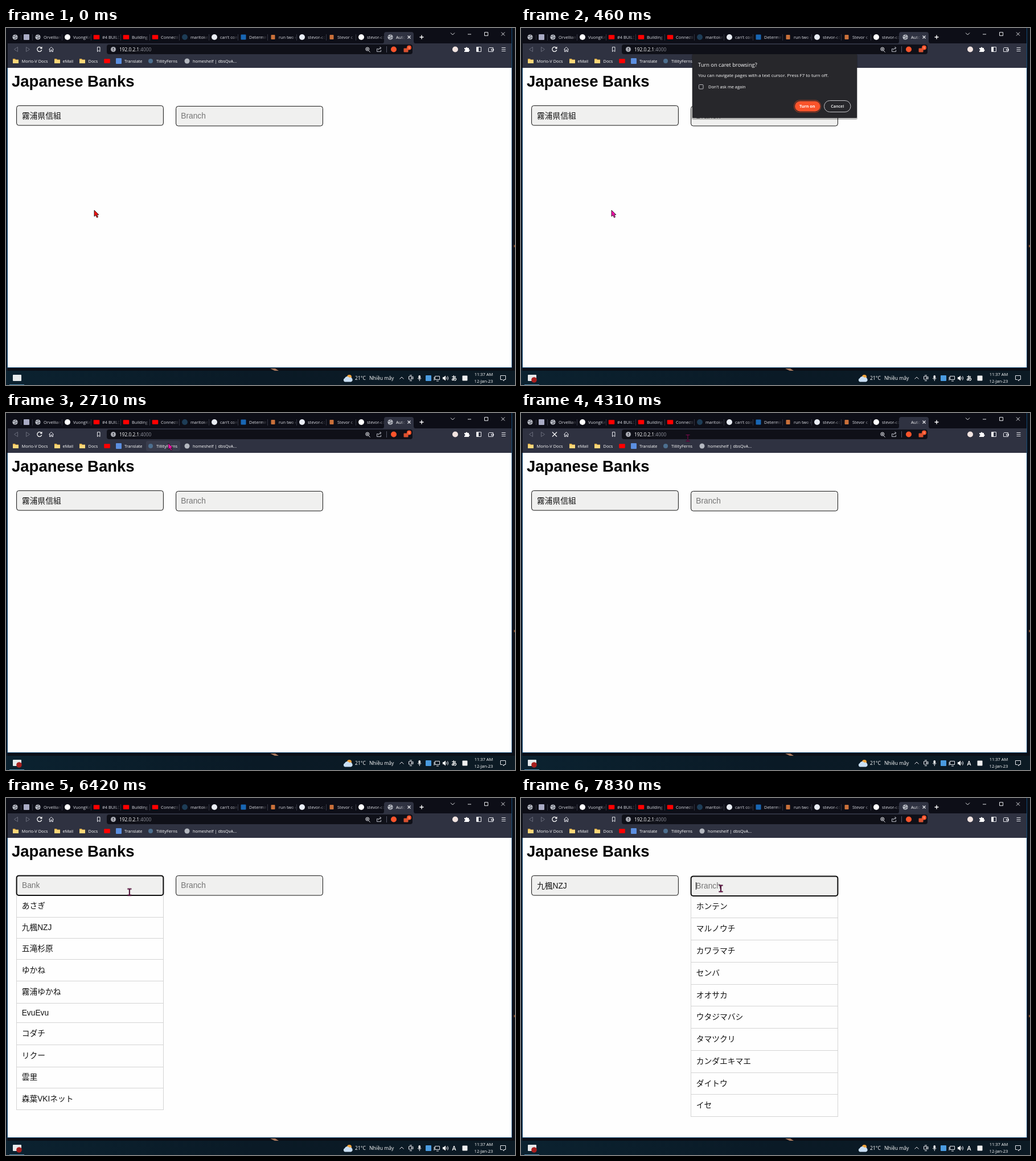
Write an HTML page that moves like this. It is 894x627 px and loops after 8000 ms.

```html
<!DOCTYPE html>
<html lang="ja">
<head>
<meta charset="utf-8">
<title>Japanese Banks</title>
<style>
html, body { margin: 0; width: 100%; height: 100%; overflow: hidden; background: #0b0d14; }
svg { display: block; }
#stage { position: absolute; left: 0; top: 0; }
text { white-space: pre; }
.ui { font-family: "Open Sans", "Noto Sans", "Noto Sans CJK JP", sans-serif; }
.web { font-family: "Liberation Sans", Arial, "Noto Sans CJK JP", "Noto Sans CJK", sans-serif; font-size: 13.76px; font-weight: 350; }
.title { font-size: 27.52px; font-weight: 700; }
.line { fill: none; stroke: #e4e5ea; stroke-width: 1; }
#dialog { animation: dialog 8s linear infinite; }
@keyframes dialog {
  0%, 1% { opacity: 0; }
  3%, 19.2% { opacity: 1; }
  19.5%, 100% { opacity: 0; }
}
#arrow path { animation: tint 8s step-end infinite; }
@keyframes tint {
  0% { fill: #f01010; }
  .375%, 100% { fill: #f010a8; }
}
#branch { animation: nudge 8s step-end infinite; }
@keyframes nudge {
  0% { transform: translateY(1px); }
  54.25% { transform: translateY(0); }
  87.875%, 100% { transform: translateY(1px); }
}
</style>
</head>
<body>
<svg id="stage" width="894" height="627" viewBox="0 0 894 627"></svg>
<script>
const LOOP = 8000;
const TAB = '#0d0e17', BAR = '#2f3241';
const rules = [];

// ---- drawing helpers ----
const text = (x, y, s, size = 7.6, fill = '#fff', more = '') =>
  `<text class="ui" x="${x}" y="${y}" font-size="${size}" fill="${fill}" ${more}>${s}</text>`;
const web = (x, y, s, fill = '#111') => `<text class="web" x="${x}" y="${y}" fill="${fill}">${s}</text>`;
const rect = (x, y, w, h, fill, r = 0, more = '') =>
  `<rect x="${x}" y="${y}" width="${w}" height="${h}" rx="${r}" fill="${fill}" ${more}/>`;
const dot = (x, y, r, fill, more = '') => `<circle cx="${x}" cy="${y}" r="${r}" fill="${fill}" ${more}/>`;
const line = (d, style = '') => `<path class="line" d="${d}" style="${style}"/>`;
const group = (id, body) => `<g id="${id}">${body}</g>`;
const square = (x, y, w, h, fill) => rect(x - w / 2, y - h / 2, w, h, fill, 1);
const globe = (x, y) => dot(x, y, 4.6, '#c3c6ce') +
  `<path d="M${x - 4} ${y - 1}q3 -1 4 1t4 0M${x - 2} ${y + 3}q2 -2 4 0M${x} ${y - 4}q-1 2 2 2" fill="none" stroke="#3c404c"/>`;
const folder = x => `<path d="M${x - 5} 54h4l1 1.5h5v6.5h-10z" fill="#e9b64c"/>` +
  rect(x - 5, 56, 10, 6, '#fbd779', .5);

// ---- timing helpers (ms) ----
const pct = ms => ms / LOOP * 100 + '%';
function show(id, ...spans) {
  let keys = '0%{opacity:0}';
  for (const [from, to] of spans) {
    keys += `${pct(from)}{opacity:1}`;
    if (to < LOOP) keys += `${pct(to)}{opacity:0}`;
  }
  rules.push(`#${id}{animation:${id} 8s step-end infinite}@keyframes ${id}{${keys}}`);
}
function move(id, points) {
  const last = points[points.length - 1];
  const keys = [...points, [LOOP, last[1], last[2]]].map(([t, x, y, ease = 'linear']) =>
    `${pct(t)}{transform:translate(${x}px,${y}px);animation-timing-function:${ease}}`).join('');
  rules.push(`#${id}{animation:${id} 8s infinite}@keyframes ${id}{${keys}}`);
}

// ---- browser frame ----
function tabs() {
  const cat = (x, y) => dot(x, y, 5, '#fff');
  const tube = (x, y) => square(x, y, 10.5, 7.5, '#f00');
  const find = (x, y) => dot(x, y, 5, '#e8ecf4');
  const stack = (x, y) => square(x, y, 7, 8, '#c9703a');
  const list = [
    [globe, 'Orvellian'], [cat, 'VuongKe'], [tube, '#4 BUILD'], [tube, 'Building a'],
    [tube, 'Connecti'], [(x, y) => dot(x, y, 5, '#1d3c56'), 'maritoke'], [find, "can't con"],
    [(x, y) => square(x, y, 9, 9, '#1866b4'), 'Determin'], [stack, 'run two c'],
    [find, 'stevor-co'], [stack, 'Stevor c'], [cat, 'stevor-co'], [globe, 'Autoc']
  ];
  const gap = 'stroke:#343643';
  let out = globe(16, 16) + square(36, 16, 10, 10, '#a9abc4') + line('M26.5 12v9', gap);
  out += `<path d="M661 27q3 0 3 -4V11q0 -4 4 -4h44q4 0 4 4v12q0 4 3 4z" fill="${BAR}"/>`;
  list.forEach(([icon, label], i) => {
    const x = Math.round(56 + 51.6 * i), active = i === list.length - 1, w = active ? 15 : 30;
    if (!active) out += line(`M${x - 9.5} 11v11`, gap);
    out += active ? group('favicon', icon(x, 16)) : icon(x, 16);
    out += `<svg x="${x + 9.5}" y="8" width="${w}" height="18">` +
      text(.5, 11, label, 7.4, active ? '#fff' : '#dcdde4') +
      rect(w - 7, 0, 7, 18, active ? 'url(#fadeBar)' : 'url(#fadeTab)') + '</svg>';
  });
  return out + line('M705.5 13.5l5 5m0 -5l-5 5', 'stroke-width:1.3') +
    line('M730 12.5v7M726.5 16h7', 'stroke:#fff;stroke-width:1.4') +
    line('M781 8.5l3.5 3.5l3.5 -3.5M811 11h6M840.5 7.5h6v6h-6zM870 7.5l6 6m0 -6l-6 6');
}

function toolbar() {
  return line('M20.5 33.5v8l-6 -4zM35.5 33.5v8l6 -4z', 'stroke:#686b79') +
    group('reload', line('M62.2 35.2A4 4 0 1 0 62.7 38.5', 'stroke:#fff;stroke-width:1.3') +
      '<path d="M63.5 32.5v4h-4z" fill="#fff"/>') +
    group('stop', line('M55 33.5l8 8m0 -8l-8 8', 'stroke:#fff;stroke-width:1.2')) +
    line('M75.5 37.5l4 -4l4 4M76.5 37v4.5h2v-3h2v3h2v-4.5') +
    line('M160.5 33.5h4.5v8l-2.2 -2l-2.3 2z') +
    rect(177, 29, 537, 17, '#0f1018', 4) +
    group('ring', rect(177, 29.5, 537, 16.5, 'none', 4, 'stroke="#6f76d9" stroke-width="1.5"')) +
    dot(188.5, 37.5, 4.5, '#a9abb3') + rect(188, 35, 1, 3, '#0f1018') + rect(188, 39, 1, 1, '#0f1018') +
    group('select', rect(199, 30, 57, 15, '#3c62a8')) +
    text(199, 40.6, '192.0.2.1<tspan fill="#8d8f99">:4000</tspan>', 8.3) +
    line('M636.5 39.5l3 3M633 37h3.5M634.8 35.3v3.5') + dot(634.8, 37, 3, 'none', 'class="line"') +
    line('M653.5 36.5h-2v5h7v-3M653.5 39q1 -4 5 -4m-2 -2l2.5 2l-2.5 2', 'stroke:#b9bbc4') +
    rect(668, 32, 1, 11, '#555866') +
    dot(681, 37.5, 5, '#fb542b') + square(702.5, 39, 8, 7, '#d9502f') +
    dot(708, 34.5, 4, '#fb542b') + text(708, 37, '1', 6, '#fff', 'text-anchor="middle"') +
    dot(789, 37.5, 5, '#f2e4e1') +
    '<path d="M805 35h2.5a1.5 1.5 0 1 1 3 0h2.5v2.5a1.5 1.5 0 1 1 0 3v1.5h-8v-2a1.5 1.5 0 1 0 0 -3z" fill="#fff"/>' +
    line('M826.5 33.5h8v8h-8z') + rect(826.5, 33.5, 3.5, 8, '#fff') +
    line('M848.5 34.5h7v7h-8v-6zM852.5 37h4v2.5h-4zM870.5 34.5h7M870.5 37.5h7M870.5 40.5h7');
}

function bookmarks() {
  return group('hover', rect(246, 49, 60, 18, '#3a3d4d', 3)) +
    folder(17) + text(27.5, 60.8, 'Morio-V Docs', 7.4) +
    folder(90) + text(99.5, 60.8, 'eMail', 7.4) +
    folder(134) + text(144.5, 60.8, 'Docs', 7.4) +
    square(177.5, 58, 10.5, 7.5, '#f00') +
    square(198, 58, 10, 10, '#5b8fe0') + text(208, 60.8, 'Translate', 7.4) +
    dot(254, 58, 4, '#4d6f8f') + text(264, 60.8, 'TillityFerns', 7.4) +
    dot(318, 58, 4.5, '#b4b8c0') + text(328, 60.8, 'homeshelf | dbsQvA...', 7.4);
}

// ---- page ----
function field(id, x, body) {
  const box = (fill, more) => rect(x + .6, 136.4, 257.8, 34.6, fill, 4, more);
  return group(id, box('#f0f0ef', 'stroke="#111"') +
    group(id + 'Focus', box('none', 'stroke="#101010" stroke-width="2"')) + body);
}
function menu(id, x, top, rows, edges, hovers = '') {
  const bottom = edges[edges.length - 1];
  let out = rect(x + .5, top, 258, bottom - top + .5, '#fefefe', 0, 'stroke="#d4d4d4"') + hovers;
  rows.forEach((s, i) => {
    const from = i ? edges[i - 1] : top;
    out += line(`M${x + 1} ${edges[i] + .5}h257`, 'stroke:#d4d4d4');
    out += web(x + 9.7, (from + edges[i]) / 2 + 4.5, s);
  });
  return group(id, out);
}
function page() {
  const banks = ['あさぎ', '九楓NZJ', '五滝杉原', 'ゆかね', '霧浦ゆかね', 'EvuEvu', 'コダチ', 'リクー', '雲里', '森葉VKIネット'];
  const branches = ['ホンテン', 'マルノウチ', 'カワラマチ', 'センバ', 'オオサカ', 'ウタジマバシ', 'タマツクリ', 'カンダエキマエ', 'ダイトウ', 'イセ'];
  const bankEdges = [209, 246, 283, 321, 360, 394, 433, 472, 509, 547];
  const branchEdges = branches.map((_, i) => Math.round(171.5 + 38.75 * (i + 1)));
  return rect(3, 70, 885, 526, '#fefefe') +
    '<text class="web title" x="10" y="102.8">Japanese Banks</text>' +
    menu('bankMenu', 18, 169.5, banks, bankEdges,
      group('over1', rect(19, 171.5, 257, 38, '#e9e9e9')) + group('over2', rect(19, 210, 257, 36.5, '#e9e9e9'))) +
    menu('branchMenu', 298, 171, branches, branchEdges) +
    field('bank', 18,
      group('first', web(28, 159, '霧浦県信組')) +
      group('empty', web(28, 158, 'Bank', '#757575')) +
      group('picked', web(28, 159, '九楓NZJ')) +
      group('bankCaret', rect(28, 147, 1, 13, '#111'))) +
    field('branch', 298,
      web(307.3, 158, 'Branch', '#757575') + group('branchCaret', rect(307, 147, 1, 13, '#111')));
}

function dialog() {
  return group('dialog',
    rect(300, 46, 291, 115, '#000', 3, 'opacity=".25"') + rect(301, 46, 289, 112, '#27272b', 1) +
    text(311, 68.3, 'Turn on caret browsing?', 9.3) +
    text(311, 86.4, 'You can navigate pages with a text cursor. Press F7 to turn off.', 7.95) +
    rect(312.5, 99.5, 7.5, 7.5, 'none', 1, 'stroke="#b9b9be"') +
    text(329, 106, "Don't ask me again", 7.4) +
    rect(479.5, 127, 47, 21, 'none', 10.5, 'stroke="#7c3524" stroke-width="1.5"') +
    rect(481, 128.5, 44.5, 18, '#fb542b', 9) +
    text(502.7, 140.2, 'Turn on', 7.2, '#fff', 'font-weight="700" text-anchor="middle"') +
    rect(532.5, 127.5, 46.5, 20, 'none', 10, 'stroke="#c4c4c8"') +
    text(555.7, 140.2, 'Cancel', 7.2, '#fff', 'font-weight="600" text-anchor="middle"') +
    group('cancelOver', rect(532.5, 127.5, 46.5, 20, '#493029', 10, 'stroke="#c9553a"') +
      text(555.7, 140.2, 'Cancel', 7.2, '#e0623f', 'font-weight="600" text-anchor="middle"')));
}

function taskbar() {
  return rect(0, 602, 894, 25, 'url(#task)') + rect(6, 626, 26, 1, '#5b93b5') +
    rect(12, 609, 15, 11, '#e6eaec', 1) + group('rec', dot(23, 618, 4.8, '#a81f1f')) +
    dot(603, 613, 4, '#f2a33a') +
    '<path d="M595 621.5a3.5 3.5 0 0 1 0 -6.5a4.5 4.5 0 0 1 8 -1a4 4 0 0 1 3 7.5z" fill="#c9dff5"/>' +
    text(613, 618.4, '21°C', 8.6) + text(638, 618.4, 'Nhiều mây', 8.6) +
    line('M691.5 616.5l3.5 -3.5l3.5 3.5') +
    line('M707.5 612h5v5h-5zM712.5 613.5l2.5 -1v4l-2.5 -1M709 610h4M709 619.5h4') +
    rect(724.5, 610, 3.5, 6, '#fff', 1.7) + line('M723 615q3.2 4 6.5 0M726.3 617v3') +
    square(742, 615, 10, 10, '#4a9be0') +
    line('M753.5 611.5h8v6h-8zM756 620h4M752 613v6') +
    '<path d="M767 613h2l3 -2.5v9l-3 -2.5h-2z" fill="#fff"/>' +
    line('M773.5 613q1.5 2 0 4M775.5 611.5q2.5 3.5 0 7') +
    group('kana', text(787, 618.8, 'あ', 10, '#fff', 'font-weight="700" text-anchor="middle"')) +
    group('latin', text(787, 618.8, 'A', 10.5, '#fff', 'font-weight="600" text-anchor="middle"')) +
    square(806, 615, 9, 9, '#f0f0f0') +
    text(839, 611.2, '11:37 AM', 7.5, '#fff', 'text-anchor="middle"') +
    text(839, 623, '12-Jan-23', 7.5, '#fff', 'text-anchor="middle"') +
    line('M868.5 610.5h9v7h-3v2.5l-2.5 -2.5h-3.5z');
}

function cursor() {
  const beam = 'M-3.5 -5.5H3.5M0 -5.5V5.5M-3.5 5.5H3.5';
  return group('cursor',
    group('arrow', '<path d="M0 0V11L2.6 8.8L4.6 13L6.6 12L4.7 8H8z" stroke="#111" stroke-width=".8"/>') +
    group('beam', `<path d="${beam}" stroke="#160810" stroke-width="2" fill="none"/><path d="${beam}" stroke="#c01585" stroke-width=".6" fill="none"/>`) +
    group('hand', '<path d="M-1 0h2v5l5 1.5v4l-2 3h-5l-4 -5l1 -1l3 2z" fill="#f010a8" stroke="#111" stroke-width=".8"/>') +
    group('press', dot(0, 0, 8, '#d2c80e', 'opacity=".75"')));
}

const fade = (id, c) => `<linearGradient id="${id}"><stop stop-color="${c}" stop-opacity="0"/><stop offset="1" stop-color="${c}"/></linearGradient>`;
document.getElementById('stage').innerHTML =
  `<defs>${fade('fadeTab', TAB)}${fade('fadeBar', BAR)}
  <linearGradient id="task"><stop stop-color="#0b2230"/><stop offset=".5" stop-color="#0a1a26"/><stop offset="1" stop-color="#0c1a24"/></linearGradient></defs>` +
  rect(0, 0, 894, 627, '#0b0f17') + rect(0, 70, 3, 532, '#0c1a27') +
  '<path d="M464 598h9l6 4h-7z" fill="#a8775c"/>' + rect(892, 381, 2, 4, '#7d4a2c') +
  rect(2.5, 0, 886, 597, TAB) + rect(3, 27, 885, 43, BAR) +
  line('M2.5 70V596.5H888.5V0', 'stroke:#124a76') +
  tabs() + toolbar() + bookmarks() + page() + dialog() + taskbar() + cursor();

// ---- timeline ----
show('rec', [30, LOOP]);
show('cancelOver', [1110, 1560]);
show('hover', [2620, 2780]);
show('ring', [3040, 4310]);
show('select', [3140, 4310]);
show('kana', [0, 3060]);
show('latin', [3060, LOOP]);
show('reload', [0, 4310], [4370, LOOP]);
show('stop', [4310, 4370]);
show('favicon', [0, 4310], [4370, LOOP]);
show('first', [0, 4340]);
show('empty', [4340, 7030]);
show('picked', [7030, LOOP]);
show('bankFocus', [5680, 6930]);
show('bankCaret', [5680, 6200], [6700, 6930]);
show('bankMenu', [5770, 7030]);
show('over1', [6450, 6600]);
show('over2', [6600, 7030]);
show('branchFocus', [7700, LOOP]);
show('branchCaret', [7700, LOOP]);
show('branchMenu', [7760, LOOP]);
show('arrow', [0, 2800], [4960, 5240], [7030, 7580]);
show('beam', [2800, 4960], [5240, 6450], [7580, LOOP]);
show('hand', [6450, 7030]);
show('press', [1440, 1530], [3040, 3300], [5680, 5810], [6930, 7060], [7700, 7810]);
move('cursor', [
  [0, 155, 320], [30, 155, 320], [460, 159, 320, 'ease-in'], [820, 415, 209, 'ease-out'],
  [1380, 559, 146], [1530, 559, 146, 'ease-in'], [1650, 555, 27], [1830, 518, -16],
  [2290, 400, -16], [2480, 335, 40, 'ease-out'], [2710, 285, 53], [2900, 293, 44],
  [4930, 293, 44, 'ease-in-out'], [5270, 229, 154], [6200, 229, 154], [6420, 217, 165],
  [6700, 176, 222], [7270, 176, 222, 'ease-in-out'], [7670, 351, 159]
]);
const sheet = document.createElement('style');
sheet.textContent = rules.join('\n');
document.head.append(sheet);
</script>
</body>
</html>
```
